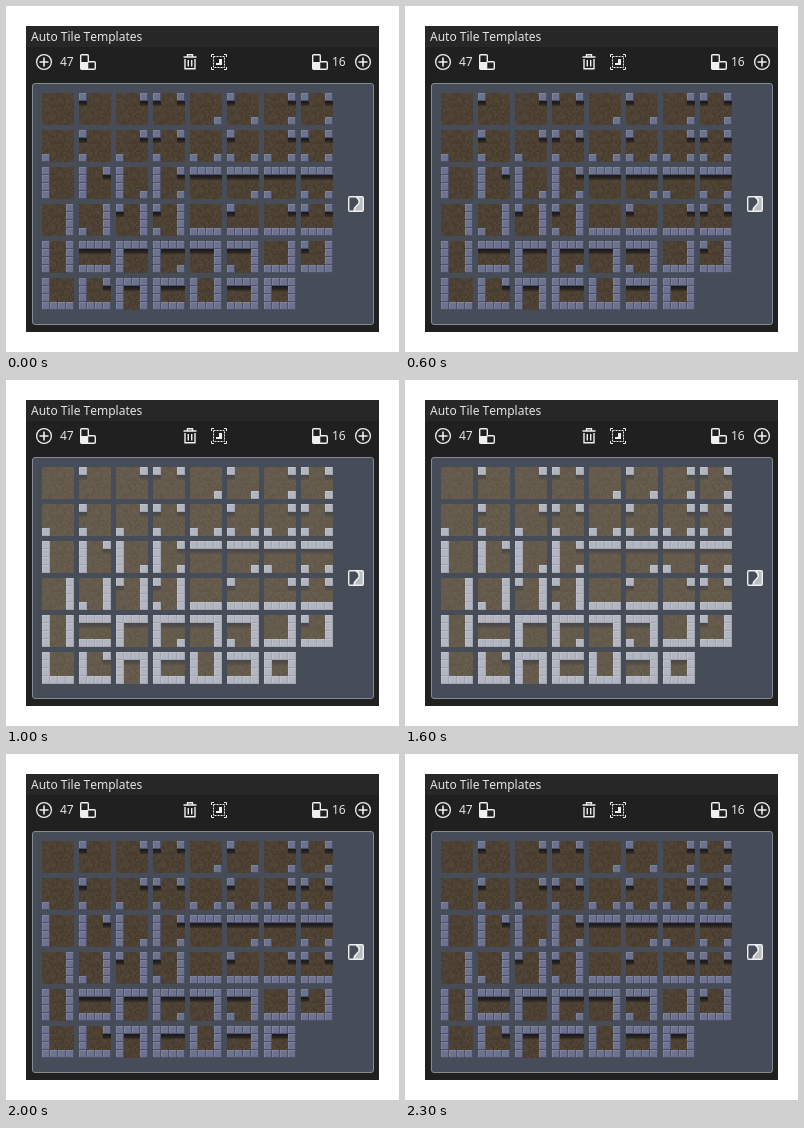
Recreate the animation shown at these times as an HTML page with a canvas. Size 393 px wide and 346 px high, loop 2500 ms.

```html
<!DOCTYPE html>
<html lang="en">
<head>
<meta charset="utf-8">
<title>Auto Tile Templates</title>
<style>
  html, body { margin: 0; width: 100%; height: 100%; overflow: hidden; background: #fff; }
  #stage { position: relative; width: 393px; height: 346px; overflow: hidden; }
  #stage > * { position: absolute; left: 0; top: 0; }
  text { font: 12px "Noto Sans", "Open Sans", sans-serif; font-kerning: none; fill: #e4e4e4; }
  #light { animation: swap 2500ms step-end infinite; }
  @keyframes swap { 0%, 80% { opacity: 0; } 40% { opacity: 1; } }
</style>
</head>
<body>
<div id="stage">
  <svg width="393" height="346" fill="none" stroke="#efefef">
    <defs>
      <g id="add" stroke-width="1.3">
        <circle r="7.4"/>
        <path d="M-4.5 0H4.5M0-4.5V4.5" stroke-width="1.6"/>
      </g>
      <g id="corner">
        <path d="M1.7.7H7.3Q8.3.7 8.3 1.7V7.7H14.3Q15.3 7.7 15.3 8.7V14.3Q15.3 15.3 14.3 15.3H1.7Q.7 15.3.7 14.3V1.7Q.7.7 1.7.7Z" stroke-width="1.4"/>
        <path d="M1 8H8.3V15H1Z" fill="#efefef" stroke="none"/>
      </g>
    </defs>
    <path d="M20 20H373V326H20Z" fill="#202020" stroke="none"/>
    <path d="M20 20H373V41H20Z" fill="#272727" stroke="none"/>
    <rect x="26.5" y="77.5" width="341" height="241" rx="2.5" fill="#464d59" stroke="#858a91"/>
    <g stroke="none">
      <text x="25" y="35">Auto Tile Templates</text>
      <text x="54" y="60">47</text>
      <text x="326" y="60">16</text>
    </g>
    <use href="#add" x="38" y="56"/>
    <use href="#add" x="357" y="56"/>
    <use href="#corner" x="74" y="48"/>
    <use href="#corner" x="306" y="48"/>
    <g stroke-width="1.4">
      <path d="M177.5 51H190.5M181.5 50.5V48.7H186.5V50.5M179 53V62.8H189V53"/>
      <path d="M182.3 54V60.5M185.7 54V60.5"/>
    </g>
    <g stroke-width="1">
      <path d="M207.5 50.5H218.5V61.5H207.5Z" stroke-dasharray="2 1"/>
      <path d="M205.5 51V48.5H208M218 48.5H220.5V51M220.5 61V63.5H218M208 63.5H205.5V61"/>
      <path d="M210 57H213V53H216V59H210Z" fill="#efefef" stroke="none"/>
    </g>
    <g>
      <path d="M350 191H356Q357.3 191 357.3 192.3V204Q357.3 205.3 356 205.3H348C348 200 354 201 353 196Q352 193 350 191Z" fill="#b9bcc1" stroke="none"/>
      <rect x="342.7" y="190.7" width="14.6" height="14.6" rx="1.3" stroke-width="1.4"/>
      <path d="M350 191Q354 193 353 197C352 200 348 200 348 205" stroke-width="1.5"/>
    </g>
  </svg>
  <canvas id="dark" width="393" height="346"></canvas>
  <canvas id="light" width="393" height="346"></canvas>
</div>
<script>
const CELL = 8, PITCH = 37, LEFT = 36, TOP = 87;

// Upper-case letters are full sides; digits are corners, clockwise from top left.
const corners = Array.from({ length: 16 }, (_, bits) =>
  [1, 2, 3, 4].filter(n => bits >> (n - 1) & 1).join(''));
const tiles = corners.concat((
  'L L2 L3 L23 T T3 T4 T34 R R4 R1 R14 B B1 B2 B12 ' +
  'LR TB LT LT3 TR TR4 RB RB1 LB LB2 LTR LTB LRB TRB LTRB').split(' '));

const themes = {
  dark: {
    floor: [76, 65, 51], grain: 11,
    wall: '#6d738f', edge: '#7d839f', seam: '#4c5168',
    face: ['#191a20', '#24211f', '#3f362b']
  },
  light: {
    floor: [100, 91, 77], grain: 8,
    wall: '#b3b6c0', edge: '#bdc0c9', seam: '#a2a6b3',
    face: ['#48484a', '#504d49', '#5d554a']
  }
};

function isWall(tile, col, row) {
  const has = key => tile.includes(key);
  const l = col === 0, r = col === 3, t = row === 0, b = row === 3;
  return l && has('L') || r && has('R') || t && has('T') || b && has('B') ||
    l && t && has('1') || r && t && has('2') || r && b && has('3') || l && b && has('4');
}

function makeRandom(seed) {
  return () => (seed = (seed * 16807) % 2147483647) / 2147483647;
}

function drawFloor(ctx, theme, x, y) {
  const random = makeRandom(4711);
  const box = (px, py, w, h, shade) => {
    ctx.fillStyle = `rgb(${theme.floor.map(v => Math.round(v + shade)).join()})`;
    ctx.fillRect(x + px, y + py, w, h);
  };
  box(0, 0, 32, 32, 0);
  for (let py = 0; py < 32; py += 2) {
    for (let px = 0; px < 32; px += 2) {
      box(px, py, 2, 2, (random() - .5) * theme.grain);
    }
  }
}

function drawBrick(ctx, theme, x, y) {
  const layers = [[theme.seam, 0, 8], [theme.edge, 0, 7], [theme.wall, 1, 6]];
  for (const [color, inset, size] of layers) {
    ctx.fillStyle = color;
    ctx.fillRect(x + inset, y + inset, size, size);
  }
}

function drawFace(ctx, theme, x, y) {
  const shade = ctx.createLinearGradient(0, y, 0, y + 5);
  theme.face.forEach((color, i) => shade.addColorStop(i / 2, color));
  ctx.fillStyle = shade;
  ctx.fillRect(x, y, CELL, 5);
}

function drawSheet(name) {
  const ctx = document.getElementById(name).getContext('2d');
  const theme = themes[name];
  tiles.forEach((tile, i) => {
    const x = LEFT + i % 8 * PITCH;
    const y = TOP + Math.floor(i / 8) * PITCH;
    drawFloor(ctx, theme, x, y);
    for (let row = 0; row < 4; row++) {
      for (let col = 0; col < 4; col++) {
        if (!isWall(tile, col, row)) continue;
        const cx = x + col * CELL, cy = y + row * CELL;
        drawBrick(ctx, theme, cx, cy);
        if (row < 3 && !isWall(tile, col, row + 1)) drawFace(ctx, theme, cx, cy + CELL);
      }
    }
  });
}

Object.keys(themes).forEach(drawSheet);
</script>
</body>
</html>
```
